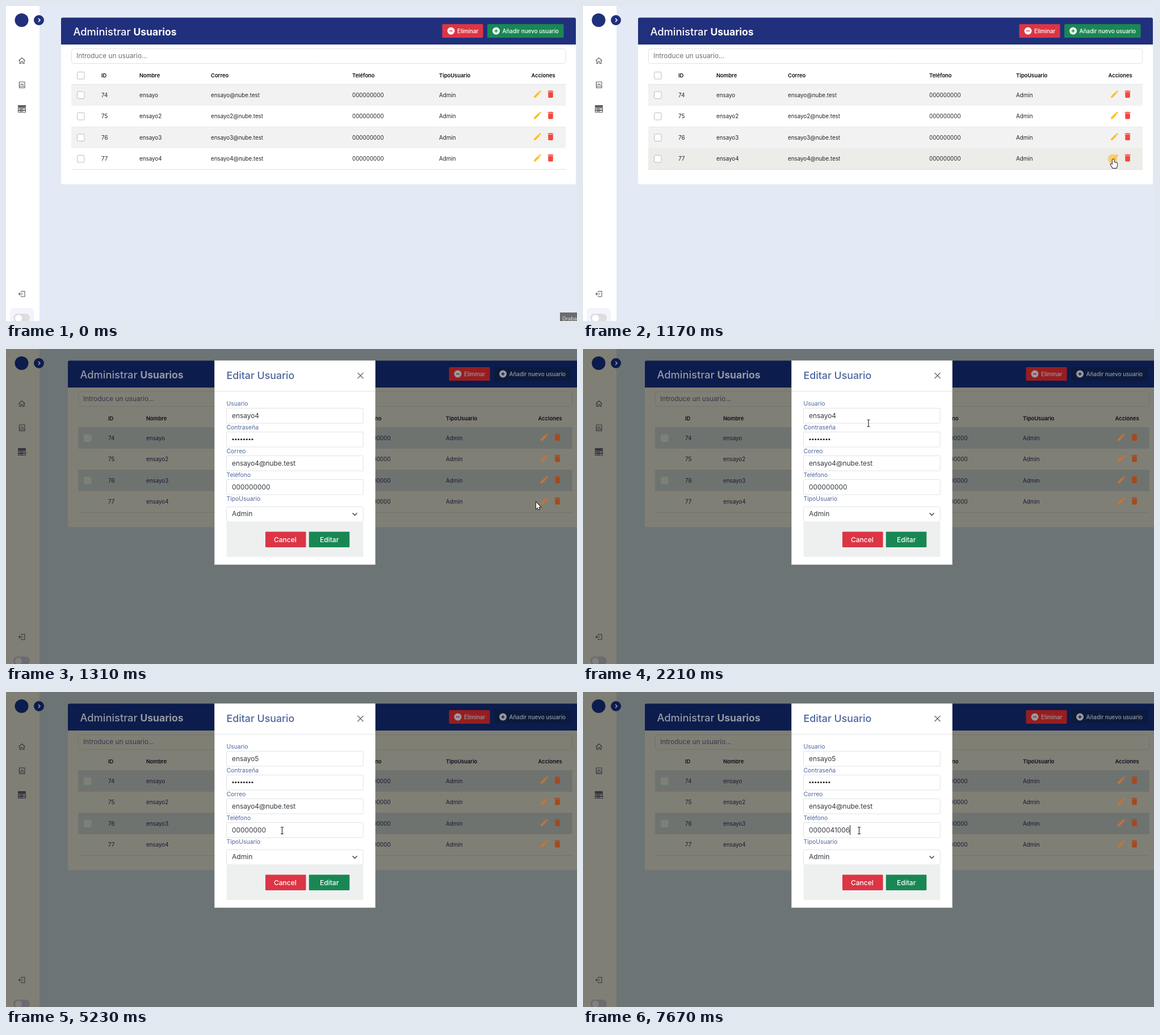
An HTML page with a canvas for the animation above (8000 ms loop, 1006 px wide and 556 px high).

```html
<!DOCTYPE html>
<html lang="es">
<head>
<meta charset="utf-8">
<title>Administrar usuarios</title>
<style>
  html, body { margin: 0; width: 100%; height: 100%; overflow: hidden; }
  canvas { display: block; }
</style>
</head>
<body>
<canvas width="1006" height="556"></canvas>
<script>
const ctx = document.querySelector('canvas').getContext('2d');
const LOOP = 8000, DIM_AT = 1240, MODAL_AT = 1310;

const lightTheme = {
  bg: '#e3e9f5', panel: '#ffffff', stripe: '#f2f2f2', hover: '#ecece8', line: '#dee2e6',
  navy: '#20307c', title: '#ffffff', red: '#dc3545', green: '#198754', box: '#b9bcc0',
  head: '#0c0c10', text: '#212529', hint: '#6b7075', pencil: '#fcc02a', trash: '#f4473c',
  icon: '#5d5d62', toggleBox: '#f4f3fd', toggle: '#dddddd', knob: '#ffffff'
};
const dimTheme = {
  bg: '#6d7475', panel: '#807f75', stripe: '#6f7370', hover: '#6f7370', line: '#70736e',
  navy: '#0c1c4d', title: '#969ba0', red: '#981d20', green: '#0b1a3d', box: '#6a8a80',
  head: '#0d0b1a', text: '#1c1733', hint: '#3a354d', pencil: '#c4743a', trash: '#a5491f',
  icon: '#35333f', toggleBox: '#807f75', toggle: '#6c6a72', knob: '#82817a'
};

const paths = {
  pencil: 'M3 17.25V21h3.75L17.81 9.94l-3.75-3.75L3 17.25zM20.71 7.04c.39-.39.39-1.02 0-1.41l-2.34-2.34c-.39-.39-1.02-.39-1.41 0l-1.83 1.83 3.75 3.75 1.83-1.83z',
  trash: 'M6 19c0 1.1.9 2 2 2h8c1.1 0 2-.9 2-2V7H6zM19 4h-3.5l-1-1h-5l-1 1H5v2h14z',
  arrow: 'M0 0V11.5L2.6 9 4.3 13 6 12.3 4.3 8.4H8Z',
  hand: 'M-1.2 1Q.2-.8 1.6 1V5L6 6.2Q7.2 6.7 7.2 8V11L5.7 15.5H-.6L-4.4 9.5Q-4.4 7.6-2.8 8.2L-1.2 9.6Z',
  beam: 'M-2.5-6H-1Q0-6 0-5Q0-6 1-6H2.5M0-5V5M-2.5 6H-1Q0 6 0 5Q0 6 1 6H2.5',
  sidebar: 'M22.5 96.5L28 91.5 33.5 96.5M24 95.5V101.5H26.5V98H29.5V101.5H32V95.5' +
    'M23.5 134H33V144.5H23.5ZM23.5 142H33M25.5 140L28 137.5 31 140M22.5 136.5H24M22.5 139.5H24' +
    'M21.5 180.5H34.5V183.5H21.5ZM21.5 184.5H34.5V187.5H21.5ZM24 182H30M24 186H30' +
    'M27 505.5V503.5H33V513H27V511M30 508.3H22.5M25 506L22.5 508.3 25 510.6'
};

function rect(x, y, w, h, fill, radius = 0, border) {
  ctx.beginPath();
  ctx.roundRect(x, y, w, h, radius);
  ctx.fillStyle = fill;
  ctx.fill();
  if (border) {
    ctx.strokeStyle = border;
    ctx.lineWidth = 1;
    ctx.stroke();
  }
}

function circle(x, y, r, fill) {
  ctx.beginPath();
  ctx.arc(x, y, r, 0, 2 * Math.PI);
  ctx.fillStyle = fill;
  ctx.fill();
}

function text(value, x, y, size, color, weight = 400) {
  ctx.font = `${weight} ${size}px Inter, "Open Sans", sans-serif`;
  ctx.fillStyle = color;
  ctx.fillText(value, x, y);
  return x + ctx.measureText(value).width;
}

function shape(d, x, y, { fill, stroke, scale = 1, width = 1 }) {
  const path = new Path2D(d);
  ctx.save();
  ctx.translate(x, y);
  ctx.scale(scale, scale);
  if (stroke) { ctx.strokeStyle = stroke; ctx.lineWidth = width; ctx.stroke(path); }
  if (fill) { ctx.fillStyle = fill; ctx.fill(path); }
  ctx.restore();
}

function drawSidebar(c) {
  rect(0, 0, 59, 556, c.panel);
  circle(27.5, 25, 12, c.navy);
  circle(58, 25, 9, c.navy);
  shape('M-1.5-3L1.5 0-1.5 3', 58.5, 25, { stroke: c.title, width: 1.6 });
  shape(paths.sidebar, 0, 0, { stroke: c.icon, width: 1.1 });
  rect(21, 175, 14, 4.5, c.icon, 1);
  rect(7, 533, 42, 40, c.toggleBox, 6);
  rect(13, 543, 29, 15, c.toggle, 7.5);
  circle(22, 551, 6, c.knob);
}

function headerButton(c, x, w, fill, label, sign) {
  rect(x, 32, w, 24, fill, 1.5);
  circle(x + 15.5, 44, 6.5, c.title);
  shape(sign, x + 15.5, 44, { stroke: fill, width: 1.5 });
  text(label, x + 26.5, 47.8, 9.8, c.title, 500);
}

function drawTable(c, hovered) {
  rect(97, 20.5, 907, 294, c.panel, 3);
  rect(97, 20.5, 907, 47.5, c.navy, [3, 3, 0, 0]);
  text('Administrar', 118.5, 51.5, 18.3, c.title, 500);
  text('Usuarios', 224.5, 51.5, 17.5, c.title, 700);
  headerButton(c, 768.5, 72, c.red, 'Eliminar', 'M-3 0H3');
  headerButton(c, 848, 134.5, c.green, 'Añadir nuevo usuario', 'M-3 0H3M0-3V3');
  rect(115.5, 75.5, 870, 26, c.panel, 4, c.line);
  text('Introduce un usuario...', 124, 92.3, 11.8, c.hint);

  const columns = { ID: 168, Nombre: 235, Correo: 361, Teléfono: 610, TipoUsuario: 763, Acciones: 925.5 };
  for (const [label, x] of Object.entries(columns)) text(label, x, 126.4, 9.4, c.head, 600);
  const checkbox = y => rect(125.5, y - 6, 12.5, 12.5, c.panel, 2, c.box);
  checkbox(122.5);

  for (let i = 0; i < 4; i++) {
    const top = 138.5 + 37.5 * i, mid = top + 18.5;
    const name = 'ensayo' + (i ? i + 1 : '');
    const fill = i === 3 && hovered ? c.hover : i % 2 ? c.panel : c.stripe;
    rect(115, top, 871, 37.5, fill);
    rect(115, Math.floor(top + 37.5), 871, 1, c.line);
    checkbox(mid);
    const cells = [74 + i, name, name + '@nube.test', '000000000', 'Admin'];
    cells.forEach((cell, k) => text(cell, Object.values(columns)[k], mid + 3.5, 9.8, c.text));
    shape(paths.pencil, 928, mid - 10, { fill: c.pencil, scale: 0.71 });
    shape(paths.trash, 951, mid - 10, { fill: c.trash, scale: 0.71 });
  }
  rect(115, 138, 871, 1, c.line);
}

function field(label, y, value, caret) {
  text(label, 388.5, y - 4, 10.4, '#4d659d');
  rect(388.5, y + 0.5, 240.75, 26.5, '#fff', 1.5, '#dee2e6');
  const end = text(value, 398, y + 17.7, 11.9, '#343a40');
  if (caret) rect(Math.round(end), y + 5, 1, 17, '#111');
}

function modalButton(x, fill, label, labelX) {
  rect(x, 322.5, 71.5, 27.5, fill, 1);
  text(label, labelX, 340.5, 12, '#fff', 500);
}

const within = (t, ...spans) => spans.some(([from, to]) => t >= from && t < to);

// Value of the last step that has begun.
const stepAt = (t, steps) => steps.reduce((now, [at, value]) => t >= at ? value : now, '');

function drawModal(t) {
  const user = stepAt(t, [[0, 'ensayo4'], [3350, 'ensayo'], [3420, 'ensayo5']]);
  const digits = '00000', typed = '41006';
  const phone = stepAt(t, [
    [0, digits + '0000'], [5230, digits + '000'], [5490, digits + '00'], [5620, digits + '0'], [5750, digits],
    ...[6680, 6880, 7340, 7470, 7670].map((at, i) => [at, digits + typed.slice(0, i + 1)])
  ]);

  rect(367.5, 20.5, 283, 360, '#fff', 0, '#d4d4d2');
  text('Editar Usuario', 388.5, 53, 17.8, '#4d659d', 500);
  shape('M-5-5L5 5M5-5L-5 5', 624.5, 47, { stroke: '#666', width: 1.3 });
  rect(368, 74, 282, 1, '#dee2e6');
  field('Usuario', 104, user, within(t, [2470, 3000], [3350, 3950], [4480, 4700]));
  field('Contraseña', 146, '');
  for (let i = 0; i < 8; i++) circle(400 + i * 4.85, 159.5, 1.6, '#222');
  field('Correo', 188, 'ensayo4@nube.test');
  field('Teléfono', 230, phone, within(t, [4700, 5230], [5360, 6280], [6680, LOOP]));
  text('TipoUsuario', 388.5, 268, 10.4, '#4d659d');
  rect(388.5, 278.5, 240.75, 26.5, '#fff', 3, '#dee2e6');
  text('Admin', 398, 295.4, 12.1, '#343a40');
  shape('M-4-2L0 2 4-2', 614.5, 291.5, { stroke: '#343a40', width: 1.4 });
  rect(388.5, 305, 241, 62, '#eef0f0', 2);
  modalButton(457, '#dc3545', 'Cancel', 472);
  modalButton(533.75, '#198754', 'Editar', 553);
}

const pointerPath = [
  { at: 70, x: 1003, y: 548 },
  { at: 1040, x: 934, y: 270.5 },
  { at: 1580, x: 934, y: 270.5 },
  { at: 2210, x: 503, y: 131 },
  { at: 4150, x: 503, y: 131 },
  { at: 4500, x: 486.5, y: 244.5 }
];

function pointerAt(t) {
  const next = pointerPath.findIndex(p => p.at > t);
  if (next < 0) return pointerPath.at(-1);
  const a = pointerPath[next - 1], b = pointerPath[next];
  const u = (t - a.at) / (b.at - a.at), eased = u * u * (3 - 2 * u);
  return { x: a.x + (b.x - a.x) * eased, y: a.y + (b.y - a.y) * eased };
}

function drawPointer(t, { x, y }) {
  if (within(t, [1170, 1240], [2470, 2540])) circle(x - 1, y - 0.5, 8.5, 'rgba(250,190,60,.6)');
  const outlined = { fill: '#fff', stroke: '#111', width: 1.8 };
  if (t >= MODAL_AT && x < 629) shape(paths.beam, x, y, { stroke: '#222', width: 1.1 });
  else if (t < DIM_AT && y < 276) shape(paths.hand, x, y, outlined);
  else shape(paths.arrow, x, y, outlined);
}

function draw(t) {
  const dimmed = t >= DIM_AT;
  const c = dimmed ? dimTheme : lightTheme;
  const pointer = t >= 70 ? pointerAt(t) : null;
  rect(0, 0, 1006, 556, c.bg);
  ctx.save();
  if (dimmed) ctx.translate(12, 0); // the page scrollbar is gone while the dialog is open
  drawTable(c, !dimmed && pointer && pointer.y < 289);
  ctx.restore();
  drawSidebar(c);
  if (t >= MODAL_AT) drawModal(t);
  if (pointer) drawPointer(t, pointer);
  else {
    rect(976, 541, 30, 15, '#6b6b6b');
    text('Grabar', 980, 554.5, 9, '#e4e4e4');
  }
}

function tick() {
  draw(performance.now() % LOOP);
  requestAnimationFrame(tick);
}
tick();
</script>
</body>
</html>
```
